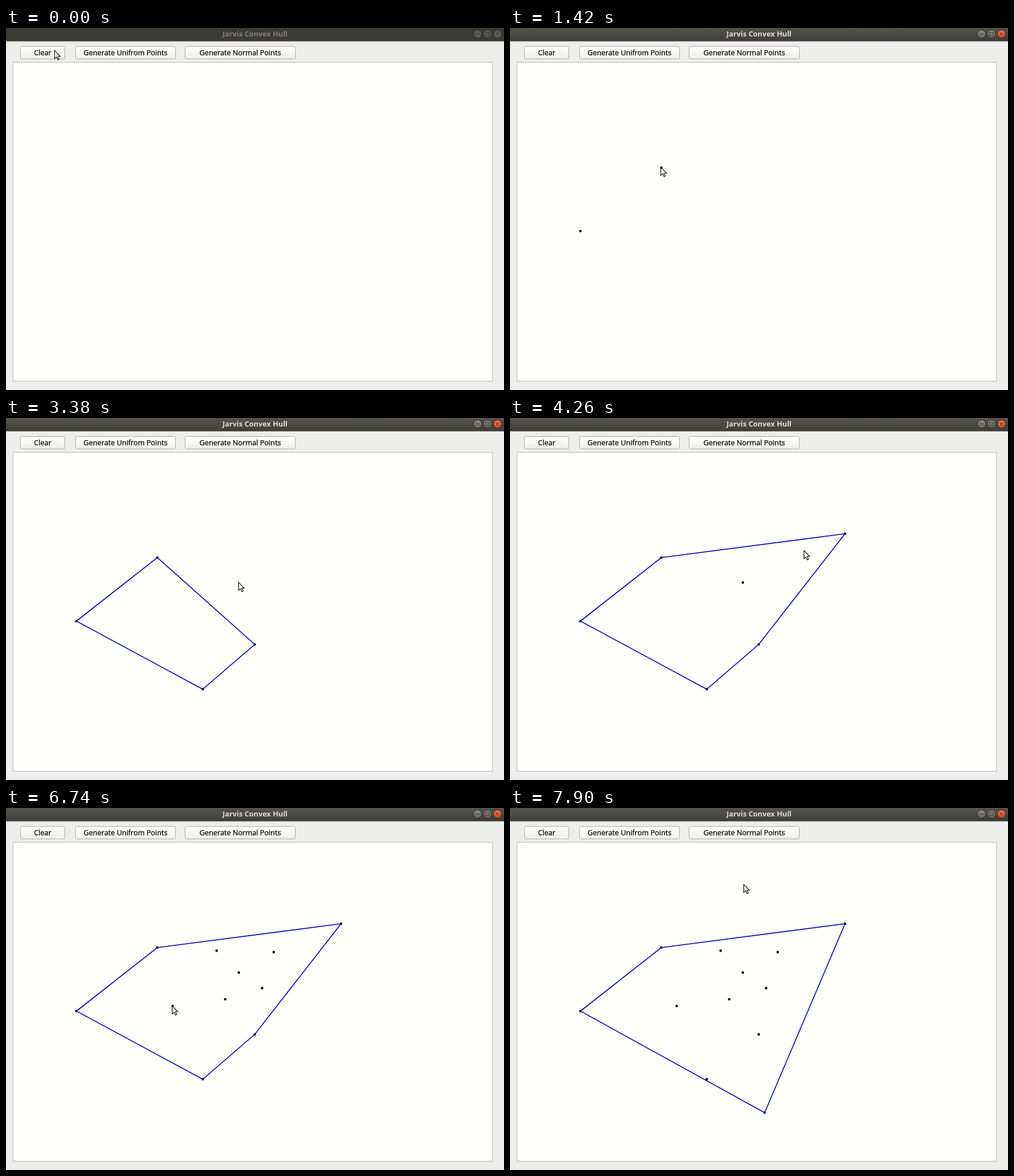
An HTML page that plays this animation: 877 px wide and 638 px high, repeating every 8 s.

```html
<!DOCTYPE html>
<html lang="en">
<head>
<meta charset="utf-8">
<title>Convex Hull</title>
<style>
  html, body { margin: 0; width: 100%; height: 100%; overflow: hidden; background: #edeeeb; }
  svg { display: block; width: 877px; height: 638px; }
  text { font: 12.75px "Open Sans", "Noto Sans", sans-serif; text-anchor: middle; }
  .button text { fill: #000; stroke: #000; stroke-width: .25; }
  .button rect { fill: url(#face); stroke: #aeaeaa; }
  #caption { font-weight: 700; font-size: 12.8px; fill: #dfdbd2; }
  .control circle { fill: url(#knob); stroke: #30302b; }
  .control path { fill: none; stroke: #37362f; }
  #close circle { fill: url(#red); }
  .inactive #bar { fill: #3c3b36; }
  .inactive #caption { fill: #807d76; }
  .inactive .control circle, .inactive #close circle { fill: #5a5953; }
  #hull { fill: none; stroke: #0000c0; stroke-width: 1.6; }
</style>
</head>
<body>
<svg viewBox="0 0 877 638">
  <defs>
    <linearGradient id="title" x2="0" y2="1">
      <stop stop-color="#55544c"/><stop offset="1" stop-color="#3e3d38"/>
    </linearGradient>
    <linearGradient id="face" x2="0" y2="1">
      <stop stop-color="#fefefd"/><stop offset="1" stop-color="#eeeeeb"/>
    </linearGradient>
    <linearGradient id="knob" x2="0" y2="1">
      <stop stop-color="#8b8980"/><stop offset="1" stop-color="#6a6961"/>
    </linearGradient>
    <linearGradient id="red" x2="0" y2="1">
      <stop stop-color="#f2714f"/><stop offset="1" stop-color="#dc4420"/>
    </linearGradient>
  </defs>
  <rect width="877" height="638" fill="#edeeeb"/>
  <g id="titlebar">
    <rect id="bar" width="877" height="23.5" fill="url(#title)"/>
    <text id="caption" x="438.5" y="15">Jarvis Convex Hull</text>
    <g class="control" transform="translate(830.5 10.5)"><circle r="7"/><path d="M-3.5 0H3.5"/></g>
    <g class="control" transform="translate(848 10.5)"><circle r="7"/><path d="M-3-3H3V3H-3Z"/></g>
    <g class="control" id="close" transform="translate(865.5 10.5)"><circle r="7"/><path d="M-2.5-2.5L2.5 2.5M2.5-2.5L-2.5 2.5"/></g>
  </g>
  <g class="button"><rect x="25.5" y="32.5" width="78" height="22" rx="2"/><text x="64.5" y="48">Clear</text></g>
  <g class="button"><rect x="122.5" y="32.5" width="176" height="22" rx="2"/><text x="210.5" y="48">Generate Unifrom Points</text></g>
  <g class="button"><rect x="315.5" y="32.5" width="194" height="22" rx="2"/><text x="412.5" y="48">Generate Normal Points</text></g>
  <rect x="12.5" y="60.5" width="844" height="562" fill="#fffffc" stroke="#b8b8b3"/>
  <path id="dots" fill="none" stroke="#000" stroke-width="4.5" stroke-linecap="round"/>
  <path id="hull"/>
  <path id="cursor" d="M.6 .7V15L4 11.9L6.4 17L8.7 16L6.4 11H10.6Z" fill="#fff" stroke="#111" stroke-width="1.2"/>
</svg>
<script>
const LOOP = 8000, STEP = 100, PACE = 120, START = [85, 39];
const $ = id => document.getElementById(id);

// Each click: time, how long before it the pointer sets off, x, y.
// The last one falls on the loop end, so only its pointer move is seen.
const clicks = [
  [840, 740, 124, 358], [1420, 380, 266.5, 246], [2080, 340, 438, 399], [2800, 240, 346.5, 478],
  [3440, 280, 410, 290], [3980, 320, 590, 204], [4580, 320, 471.5, 254], [5080, 320, 371, 251.5],
  [5620, 240, 386, 337], [6200, 320, 451, 317.5], [6740, 260, 293.5, 349], [7360, 280, 448.5, 537],
  [LOOP, 420, 412, 135]
].map(([time, lead, x, y]) => ({ time, lead, point: [x, y] }));

const easeOut = u => 1 - (1 - u) ** 2.3;

function pointerAt(time) {
  let pos = START;
  for (const { time: click, lead, point } of clicks) {
    const elapsed = time - (click - lead);
    if (elapsed < 0) break;
    const steps = Math.round(lead / PACE);
    const done = Math.min(steps, Math.floor(elapsed / STEP) + 1);
    const f = easeOut(done / steps);
    pos = pos.map((p, i) => Math.round(p + (Math.floor(point[i]) - 1 - p) * f));
  }
  return pos;
}

const cross = (a, b, c) => (b[0] - a[0]) * (c[1] - a[1]) - (b[1] - a[1]) * (c[0] - a[0]);

// Gift wrapping from the leftmost point
function convexHull(points) {
  const first = points.reduce((a, b) => b[0] < a[0] ? b : a);
  const hull = [];
  let current = first;
  do {
    hull.push(current);
    let next = points.find(p => p !== current);
    for (const p of points) if (cross(current, next, p) < 0) next = p;
    current = next;
  } while (current !== first && hull.length < points.length);
  return hull;
}

function render(time) {
  const points = clicks.filter(c => c.time <= time).map(c => c.point);
  $("dots").setAttribute("d", points.map(p => `M${p}h0`).join(""));
  $("hull").setAttribute("d", points.length < 3 ? "" : `M${convexHull(points).join("L")}Z`);
  $("cursor").setAttribute("transform", `translate(${pointerAt(time)})`);
  $("titlebar").setAttribute("class", points.length ? "" : "inactive");
}

const begin = performance.now();
function tick() {
  render((performance.now() - begin) % LOOP);
  requestAnimationFrame(tick);
}
tick();
</script>
</body>
</html>
```
